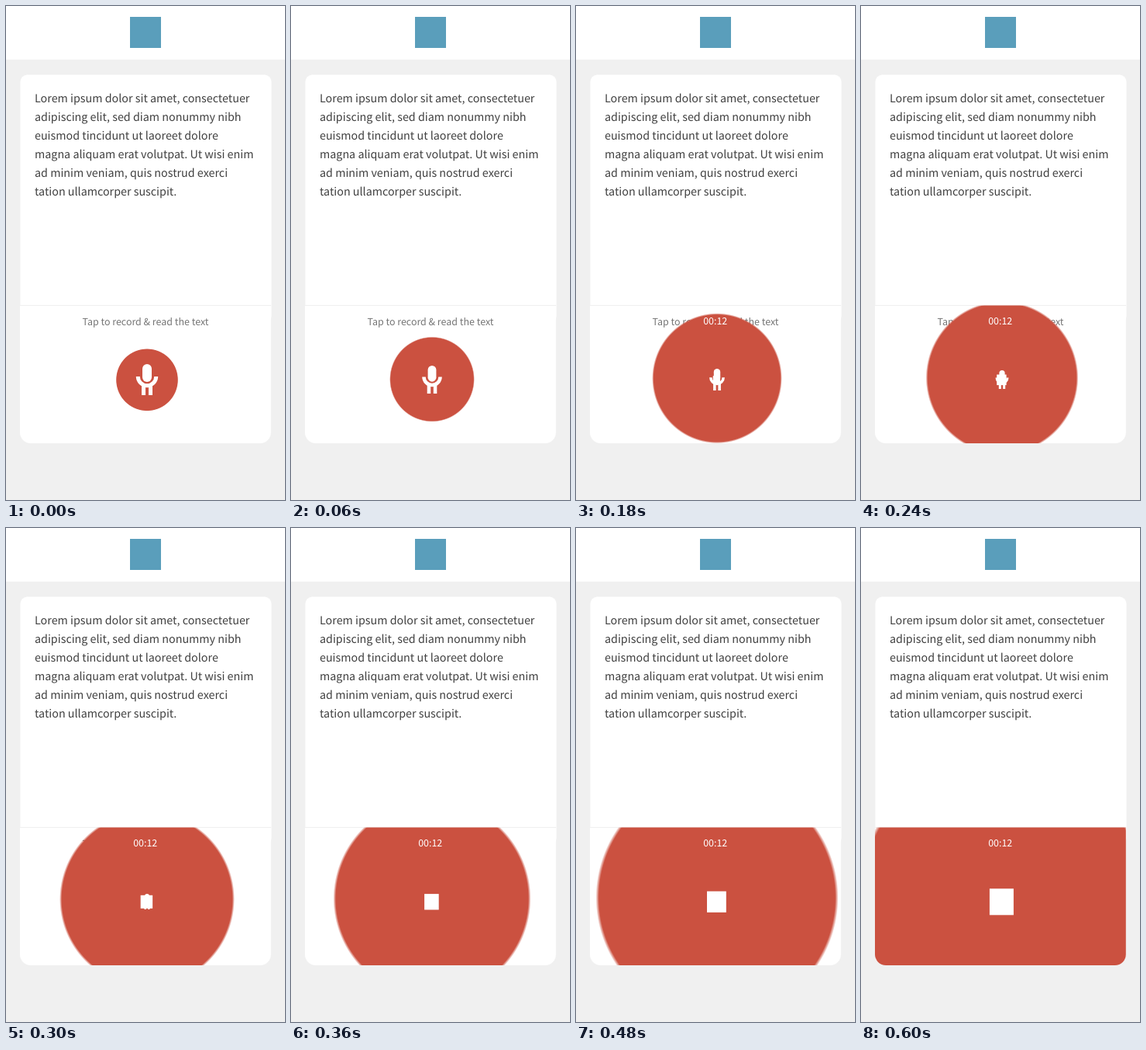
Animation, 360 px wide and 636 px high, one loop 900 ms. Source, as an HTML page:

```html
<!DOCTYPE html>
<html lang="en">
<head>
<meta charset="utf-8">
<title>Record button</title>
<style>
  html, body { margin: 0; width: 100%; height: 100%; overflow: hidden; background: #f0f0f0; }
  svg { display: block; width: 360px; height: 636px; }
  text { font: 14.32px "Noto Sans CJK JP", "Noto Sans CJK SC", "Noto Sans CJK", sans-serif; text-rendering: geometricPrecision; fill: #404040; }
  text.small { font-size: 12.45px; text-anchor: middle; fill: #757575; }
  text.timer { fill: #fff; }
</style>
</head>
<body>
<svg viewBox="0 0 360 636">
  <defs>
    <radialGradient id="soft">
      <stop offset=".973" stop-color="#cb5140"/>
      <stop offset="1" stop-color="#cb5140" stop-opacity="0"/>
    </radialGradient>
    <clipPath id="panel">
      <path d="M18 385.6H341.8V549a14 14 0 0 1-14 14H32a14 14 0 0 1-14-14Z"/>
    </clipPath>
  </defs>

  <rect width="360" height="69" fill="#fff"/>
  <rect x="160" y="14" width="40" height="40" fill="#5a9ebb"/>

  <rect x="18.5" y="88.5" width="324" height="320" rx="9" fill="#fff"/>
  <path d="M18 385H341.8V549a14 14 0 0 1-14 14H32a14 14 0 0 1-14-14Z" fill="#fff"/>
  <rect x="18" y="385" width="324" height="1" fill="#f0f0f0"/>

  <text>
    <tspan x="37" y="124">Lorem ipsum dolor sit amet, consectetuer</tspan>
    <tspan x="37" y="148">adipiscing elit, sed diam nonummy nibh</tspan>
    <tspan x="37" y="172">euismod tincidunt ut laoreet dolore</tspan>
    <tspan x="37" y="196">magna aliquam erat volutpat. Ut wisi enim</tspan>
    <tspan x="37" y="220">ad minim veniam, quis nostrud exerci</tspan>
    <tspan x="37" y="244">tation ullamcorper suscipit.</tspan>
  </text>
  <text class="small" x="180" y="411">Tap to record &amp; read the text</text>

  <g clip-path="url(#panel)">
    <circle id="disc" r="40.35" fill="url(#soft)"/>
  </g>
  <text id="timer" class="small timer" x="179.7" y="410">00:12</text>

  <g id="mic" fill="#fff">
    <rect x="-6" y="-20" width="12" height="23" rx="6"/>
    <path d="M-11.7-4A11.7 11.7 0 0 0 11.7-4" fill="none" stroke="#fff" stroke-width="5"/>
    <path d="M-7 6H-2V20H-7ZM2 6H7V20H2Z"/>
  </g>
  <rect id="stop" x="-15.5" y="-17" width="31" height="34" fill="#fff"/>
</svg>
<script>
  const LOOP = 900, STEP = 30, GROW = 600;
  const [disc, timer, mic, stop] = ['disc', 'timer', 'mic', 'stop'].map(id => document.getElementById(id));

  const place = (el, x, y, scale) =>
    el.setAttribute('transform', `translate(${x} ${y}) scale(${scale})`);

  function draw(now) {
    const t = Math.min(GROW, Math.floor(now % LOOP / STEP) * STEP);
    const p = t / GROW;
    place(disc, 182, 481.3 - 6.8 * p, 1 + 3.6 * p);
    place(mic, 182, 481, 1 - p);
    place(stop, 181.4, 481.3, p);
    timer.style.visibility = t >= 150 ? 'visible' : 'hidden';
    requestAnimationFrame(() => draw(performance.now() - start));
  }

  const start = performance.now();
  draw(0);
</script>
</body>
</html>
```
